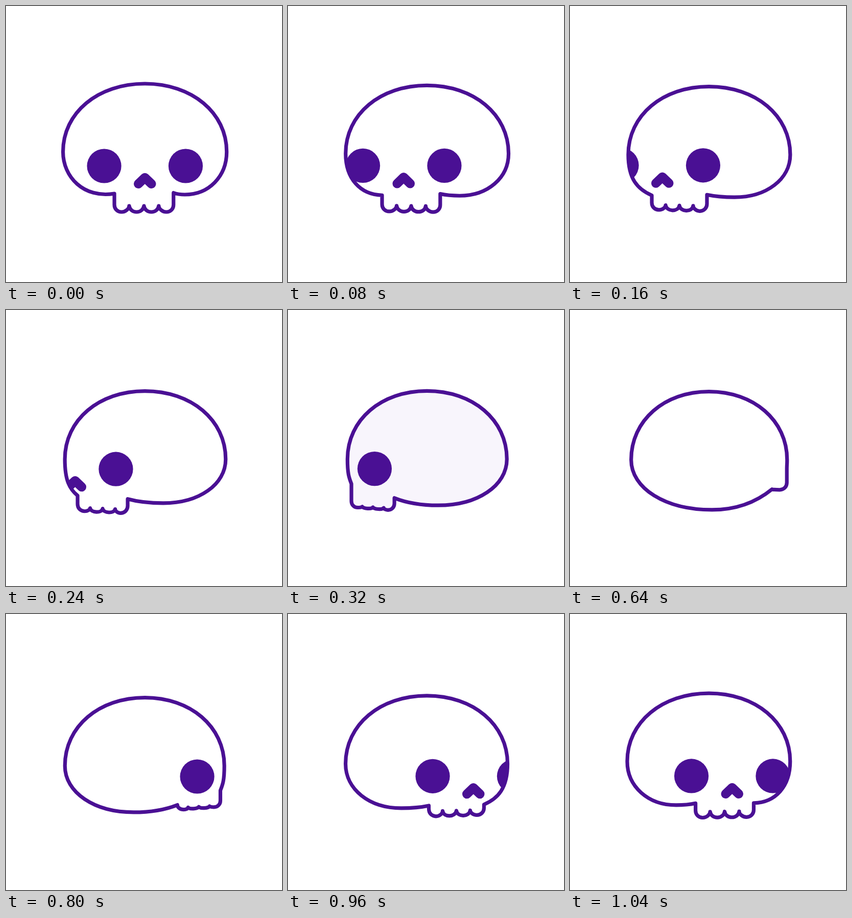
An HTML page with a canvas that plays this animation: 540 px wide and 540 px high, repeating every 1120 ms.

```html
<!DOCTYPE html>
<html lang="en">
<head>
<meta charset="utf-8">
<title>Turning skull</title>
<style>
  html, body { margin: 0; width: 100%; height: 100%; overflow: hidden; background: #fff; }
  canvas { display: block; }
</style>
</head>
<body>
<canvas id="stage" width="540" height="540"></canvas>
<script>
const ctx = document.getElementById('stage').getContext('2d');
const INK = '#4a1094', WHITE = '#fff', TINT = '#f8f5fc';
const STEP_MS = 80, STEPS = 14, BACK = STEPS / 2, TINT_STEP = 4;
const SIZE = 540, MID = 271.75, ROUND = 0.575;

// Heights while turning away and coming back: a + b*m + c*m*m,
// where m is the number of steps from the front view.
const away = { top: [152, 4, -0.6], low: [369, 1.9, 0.35], teeth: [403, 0, -1.03], eye: [313, -0.6, 0] };
const back = { top: [148.3, 7.7, -0.97], low: [366.8, 7.8, -0.63], teeth: [398.6, 0, -1.3], eye: [316.6, 0.35, 0] };

const mix = (a, b, t) => a + (b - a) * t;
const poly = ([a, b, c], m) => a + b * m + c * m * m;

// The skull turned to the left by m steps
function pose(m, heights) {
  const [top, low, teeth, eye] = ['top', 'low', 'teeth', 'eye'].map(k => poly(heights[k], m));
  const left = MID - 160.2 + 1.2 * m;
  const nearX = Math.max(MID - 59.7 - 30 * m + 2 * m * m, left + 0.5);
  return {
    m, top, low, eye, left,
    side: top + 133.3,
    right: MID + 160 - 0.22 * m * m,
    lowX: MID + 78 - 14 * m,
    near: { x: nearX, y: top + Math.max(150, 215 - 0.13 * m ** 4), bottom: teeth },
    far: {
      x: Math.max(nearX, MID + 56 - 29.9 * m),
      y: low - 3.5 - 0.17 * m ** 3,
      bottom: teeth + 1.2 * m
    }
  };
}

// Quarter oval; leaves vertically when upright, else horizontally
function quarter(p, x0, y0, x1, y1, upright) {
  const dx = (x1 - x0) * ROUND, dy = (y1 - y0) * ROUND;
  if (upright) p.bezierCurveTo(x0, y0 + dy, x1 - dx, y1, x1, y1);
  else p.bezierCurveTo(x0 + dx, y0, x1, y1 - dy, x1, y1);
}

// Outer tooth between the jaw wall and a valley, drawn right to left
function outerTooth(p, jaw, vx, vy, rising) {
  const { x, y, bottom } = jaw;
  const r = Math.min(14, Math.abs(vx - x) * 0.6);
  const wall = Math.max(y, bottom - r);
  const mx = x + Math.sign(vx - x) * r;
  const ax = mix(mx, vx, 0.55), ay = mix(vy, bottom, 0.45);
  if (rising) {
    p.bezierCurveTo(vx, ay, ax, bottom, mx, bottom);
    quarter(p, mx, bottom, x, wall, false);
    p.lineTo(x, y);
  } else {
    p.lineTo(x, wall);
    quarter(p, x, wall, mx, bottom, true);
    p.bezierCurveTo(ax, bottom, vx, ay, vx, vy);
  }
}

function teeth(p, near, far, count) {
  if (count < 2) {
    if (count) outerTooth(p, near, far.x, far.y, true);
    else p.lineTo(near.x, near.y);
    return;
  }
  const w = (far.x - near.x) / count;
  const depth = Math.max(3, (w - 18.5) * 1.15);
  const valley = i => [far.x - w * i, mix(far.bottom, near.bottom, i / count) - depth];
  outerTooth(p, far, ...valley(1), false);
  for (let i = 1; i < count - 1; i++) {
    const [ax, ay] = valley(i), [bx, by] = valley(i + 1);
    const dip = depth * 4 / 3, inset = w * 0.08;
    p.bezierCurveTo(ax - inset, ay + dip, bx + inset, by + dip, bx, by);
  }
  outerTooth(p, near, ...valley(count - 1), true);
}

function outline({ m, top, side, left, right, low, lowX, near, far }) {
  const p = new Path2D();
  const count = Math.min(4, Math.round((far.x - near.x) / 20.5));
  const bend = count ? 0.42 : 0;

  p.moveTo(MID, top);
  quarter(p, MID, top, right, side, false);
  quarter(p, right, side, lowX, low, true);
  p.quadraticCurveTo(mix(far.x, lowX, bend), low, far.x, far.y);
  teeth(p, near, far, count);
  p.bezierCurveTo(
    mix(near.x, left, 0.6), near.y + Math.max(-12, 10 - 11 * m),
    left, mix(side, near.y, 0.6),
    left, side
  );
  quarter(p, left, side, MID, top, true);
  p.closePath();
  return p;
}

function face(x, y) {
  for (const dx of [-79.7, 79.7]) {
    ctx.beginPath();
    ctx.arc(x + dx, y, 33.6, 0, Math.PI * 2);
    ctx.fill();
  }
  ctx.lineWidth = 18;
  ctx.beginPath();
  ctx.moveTo(x - 12.8, y + 35);
  ctx.lineTo(x, y + 22.7);
  ctx.lineTo(x + 12.8, y + 35);
  ctx.stroke();
}

function draw(step) {
  const leaving = step < BACK;
  const m = leaving ? step : STEPS - step;
  const skull = pose(m, leaving ? away : back);
  const shape = outline(skull);

  ctx.fillStyle = WHITE;
  ctx.fillRect(0, 0, SIZE, SIZE);
  ctx.save();
  if (!leaving) {
    ctx.translate(2 * MID, 0);
    ctx.scale(-1, 1);
  }
  ctx.fillStyle = step === TINT_STEP ? TINT : WHITE;
  ctx.fill(shape);

  ctx.strokeStyle = ctx.fillStyle = INK;
  ctx.lineCap = ctx.lineJoin = 'round';
  ctx.save();
  ctx.clip(shape);
  face(MID - 45.5 * m, skull.eye);
  ctx.restore();
  ctx.lineWidth = 7.2;
  ctx.stroke(shape);
  ctx.restore();
}

function tick() {
  draw(Math.floor(performance.now() / STEP_MS) % STEPS);
  requestAnimationFrame(tick);
}
tick();
</script>
</body>
</html>
```
